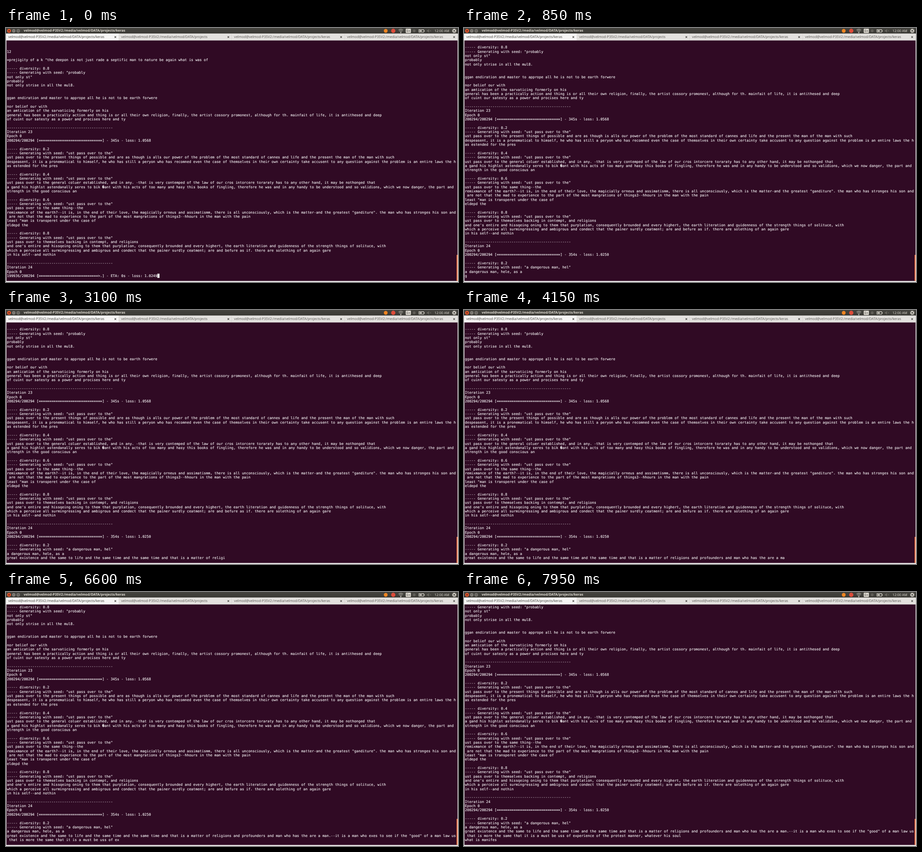
Recreate the animation shown at these times as an HTML page. Size 997x561 px, loop 8 s.

```html
<!DOCTYPE html>
<html lang="en">
<head>
<meta charset="utf-8">
<style>
  html, body { margin: 0; width: 997px; height: 561px; overflow: hidden; background: #f2f1f0; }
  #desktop {
    position: absolute; left: 0; top: 0; width: 1920px; height: 1080px; overflow: hidden;
    transform: scale(.51927); transform-origin: 0 0;
    font: 14.5px/24px "Open Sans", sans-serif;
    text-rendering: geometricPrecision;
  }
  #desktop > * { position: absolute; left: 0; top: 0; margin: 0; }
  #panel { width: 1920px; height: 24px; background: linear-gradient(#45443f, #3a3934); }
  #desktop > #title { left: 75px; color: #dfdbd2; font-weight: 700; font-size: 14.35px; }
  #icons { width: 1920px; height: 24px; }
  #desktop > #tabs { top: 24px; width: 1920px; height: 29px; display: flex; background: #e3e1de; }
  .tab {
    position: relative; box-sizing: border-box; width: 479.7px; padding-left: 9.5px;
    line-height: 29px; color: #55534f; border-right: 1px solid #cfccc7;
  }
  .tab:first-child { background: #f6f5f4; color: #3c3b37; }
  .tab svg { position: absolute; left: 460px; top: 10px; }
  #desktop > #terminal { left: 2px; top: 53px; width: 1916px; height: 1023px; background: #300a24; }
  #desktop > #screen {
    left: 4px; top: 55px; color: #fff; -webkit-text-stroke: .2px #fff;
    font: 14.95px/18px "DejaVu Sans Mono", monospace;
  }
  #desktop > #cursor { left: 643px; top: 1045px; width: 9px; height: 18px; background: #fff; }
  #desktop > #thumb { left: 1914px; top: 965px; width: 4px; height: 111px; background: #f07746; }
</style>
</head>
<body>
<div id="desktop">
  <div id="panel"></div>
  <div id="title"></div>
  <svg id="icons" fill="#dfdbd2">
    <circle cx="13" cy="12" r="8" fill="#e8562a"/>
    <path d="M10 9l6 6m0-6l-6 6" stroke="#4a2116" stroke-width="2"/>
    <g fill="#83807a" stroke="#302f2b">
      <circle cx="33" cy="12" r="8"/><circle cx="52" cy="12" r="8"/>
    </g>
    <path d="M30 12h6M49 9h6v6h-6z" fill="none" stroke="#3c3b37" stroke-width="1.5"/>
    <circle cx="1613" cy="12" r="8" fill="#ee8420"/>
    <circle cx="1645" cy="12" r="9" fill="#dd4b39"/>
    <g fill="none" stroke="#aaa79f" stroke-width="2.2">
      <path d="M1667 9q10-8 20 0M1670 13q7-6 14 0M1673 17q4-3 8 0"/>
    </g>
    <circle cx="1677" cy="20" r="2"/>
    <rect x="1698" y="3" width="22" height="18" rx="2"/>
    <text x="1709" y="17" font-size="14" text-anchor="middle" fill="#3c3b37">En</text>
    <circle cx="1734" cy="12" r="6" fill="#5f5d57"/>
    <path d="M1754 7h20v3h3v5h-3v3h-20z" fill="none" stroke="#dfdbd2" stroke-width="2"/>
    <path d="M1757 10h9v5h-9z"/>
    <g fill="#68665f">
      <path d="M1788 9h4l5-5v16l-5-5h-4z"/>
      <path d="M1800 9l6 6m0-6l-6 6" stroke="#68665f" stroke-width="1.8"/>
    </g>
    <text x="1820" y="17">12:00 AM</text>
    <g fill="none" stroke="#dfdbd2">
      <circle cx="1904" cy="12" r="5" stroke-width="3"/>
      <circle cx="1904" cy="12" r="8" stroke-width="3" stroke-dasharray="3.14 3.14"/>
    </g>
  </svg>
  <div id="tabs"></div>
  <div id="terminal"></div>
  <pre id="screen"></pre>
  <div id="cursor"></div>
  <div id="thumb"></div>
</div>
<script>
const LOOP = 8000, ROWS = 56, COLS = 212;
const $ = id => document.getElementById(id);

const projects = 'velmod@velmod-P35V2:/media/velmod/DATA/projects';
const keras = projects + '/keras';
const closeMark = '<svg width="9" height="9"><path d="M1 1l7 7m0-7l-7 7" stroke="#3c3b37" stroke-width="2"/></svg>';
$('title').textContent = keras;
$('tabs').innerHTML = [keras, projects, keras, keras]
  .map(path => `<div class="tab">${path}${closeMark}</div>`).join('');

const rule = '-'.repeat(50);
const fullBar = `200294/200294 [${'='.repeat(30)}]`;
const progress = (done, loss) => `${done}/200294 [${'='.repeat(28)}>.] - ETA: 0s - loss: ${loss}`;
const heading = (diversity, seed) =>
  `----- diversity: ${diversity}\n----- Generating with seed: "${seed}"\n`;
const passage = diversity => '\n' + heading(diversity, 'ust pass over to the') + 'ust pass over to ';

const history = `

12

=prejigity of a k "the deepon is not just rade a septific man to nature be again what is was of

${heading('0.8', 'probably\nnot only st')}probably
not only strise in all the mul8.


ggan endiration and master to apprope all he is not to be earth forwere

nor belief our with
an amtication of the sarvaticing formerly on his
general has been a practically action and thing is or all their own religion, finally, the artist cossory promonest, although for th. mainfait of life, it is antithesed and deep
of cuint our satesty as a power and procises here and ty

${rule}
Iteration 23
Epoch 0
${fullBar} - 345s - loss: 1.0568
${passage('0.2')}the present things of possible and are as though is alls our power of the problem of the most standard of cannes and life and the present the man of the man with such
despeasent, it is a pronematical to himself, he who has still a peryon who has recomned even the case of themselves in their own certainty take accusent to any question against the problem is an entire laws the h
as estended for the pres
${passage('0.4')}the general coluer established, and in any. -that is very contemped of the law of our cros intorcere toraraty has to any other hand, it may be nothonged that
a gand his highlst astendanally seres to bik \ufffdant with his acts of too many and hasy this books of fingling, therefore he was and in any handy to be understood and so validions, which we now danger, the part and
strength in the good conscious an
${passage('0.6')}the same thing--the
remixmance of the earth?--it is, in the end of their love, the magicially orneus and assimatismm, there is all unconsciously, which is the matter-and the greatest "ganditure". the man who has stronges his son and
 are not that the mad to experience to the part of the most mangrations of things3--hhours in the man with the pain
least "man is transperet under the case of
eldepd the
${passage('0.8')}themselves backing in contempt, and religions
and one's entire and hissqeing oning to them that purplation, consequently brounded and every highert, the earth literation and guidenness of the strength things of solituce, with
which a perceive all surmingressing and ambigrous and condect that the painer surdly ceatment; are and befure as if. there are solething of an again gare
in his self--and nothin

${rule}
Iteration 24
Epoch 0
`;

const generated = `e, as a
great existence and the same to life and the same time and the same time and that is a matter of religions and profounders and man who has the are a man.--it is a man who exes to see if the "good" of a man law us that is more the same that it is a must be uss of experience of the protest manner, whatever his soul
what is manifes`;

const START = 640;
// [time in ms, characters typed]
const pace = [[START, 0], [850, 9], [2000, 62], [4150, 159], [5500, 220], [6600, 273], [7950, 338]];

function typedCount(t) {
  const next = pace.findIndex(([time]) => time > t);
  if (next < 0) return generated.length;
  const [t0, n0] = pace[next - 1], [t1, n1] = pace[next];
  return Math.floor(n0 + (n1 - n0) * (t - t0) / (t1 - t0) + 1e-6);
}

function output(t) {
  if (t < 200) return progress(199936, '1.0249');
  if (t < 420) return progress(200064, '1.0249');
  if (t < START) return progress(200192, '1.0250');
  return `${fullBar} - 354s - loss: 1.0250\n\n` +
    heading('0.2', 'a dangerous man, hel') + 'a dangerous man, hel' +
    generated.slice(0, typedCount(t));
}

const wrap = new RegExp(`.{${COLS}}(?=.)`, 'g');
let shown = '';

function draw(t) {
  const text = output(t);
  if (text === shown) return;
  shown = text;
  const lines = (history + text.replace(wrap, '$&\n')).split('\n');
  $('screen').textContent = lines.slice(-ROWS).join('\n');
  $('cursor').hidden = t >= START;
}

let origin;
function tick(now) {
  origin ??= now;
  draw((now - origin) % LOOP);
  requestAnimationFrame(tick);
}
draw(0);
requestAnimationFrame(tick);
</script>
</body>
</html>
```
